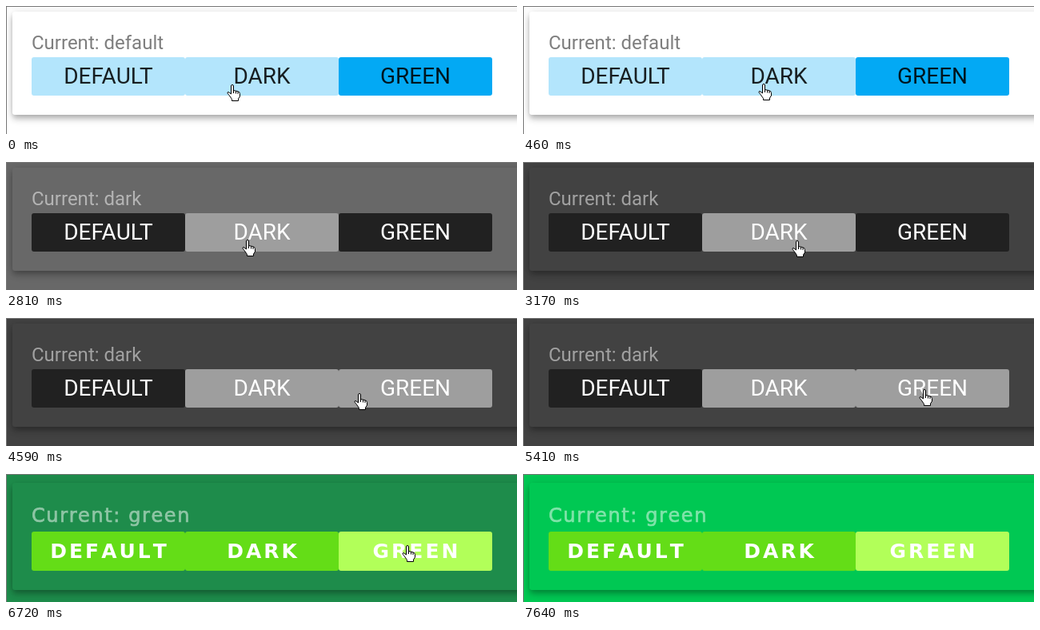
Animation of 639x160 px, one loop 9230 ms. Source, as an HTML page:

```html
<!DOCTYPE html>
<html lang="en">
<head>
<meta charset="utf-8">
<title>Theme switcher</title>
<style>
  html, body { margin: 0; width: 100%; height: 100%; overflow: hidden; }
  #stage {
    --base: #03a9f4; --lit: #b3e5fc; --ink: rgba(0,0,0,.87); --label: #000;
    position: relative; width: 639px; height: 160px; overflow: hidden;
    font-family: Roboto, sans-serif;
  }
  #stage.dark { --base: #212121; --lit: #9e9e9e; --ink: #fff; --label: #fff; }
  #stage.green {
    --base: #64dd17; --lit: #b2ff59; --ink: #fff; --label: #fff;
    font-family: "DejaVu Sans", sans-serif; font-kerning: none;
  }
  #stage > * { position: absolute; }
  #edge { inset: 0; border: solid #777; border-width: 1px 0 0 1px; }
  #card {
    left: 8px; top: 7px; width: 680px; height: 129px; border-radius: 3px; background: inherit;
    box-shadow: 0 3px 6px -1.5px rgba(0,0,0,.2), 0 6px 7.5px rgba(0,0,0,.14), 0 1.5px 15px rgba(0,0,0,.12);
  }
  #label {
    left: 32px; top: 30px; font-size: 24px; line-height: 32px; white-space: pre;
    color: var(--label); opacity: .5;
  }
  .button {
    top: 64px; width: 192px; height: 48px; border-radius: 3px; background: var(--base);
    color: var(--ink); font-size: 28px; line-height: 48px; text-align: center;
  }
  .button.lit { background: var(--lit); }
  .green #card { top: 11px; height: 134px; }
  .green #label { top: 36px; letter-spacing: 1.6px; -webkit-text-stroke: .7px; }
  .green .button {
    top: 72px; height: 49px; font-size: 25px; font-weight: bold; line-height: 50px;
    letter-spacing: 3px; text-indent: 3px;
  }
  #pointer { left: 0; top: 0; width: 17px; height: 22px; overflow: visible; }
  #pointer path { fill: #fff; stroke: #000; stroke-linejoin: round; }
</style>
</head>
<body>
<div id="stage">
  <div id="card"></div>
  <div id="edge"></div>
  <div id="label"></div>
  <svg id="pointer">
    <g id="hand">
      <path d="M5.5 12V2Q5.5 .5 7 .5T8.5 2V7.5L13 8.5Q16.5 9 16.5 11.5V15L14.5 18V20.5H6.5V18.5L3 13.5Q.5 11 1 10T3 10L5.5 12"/>
      <path d="M8.5 7V11M11.5 8.5V11.5M14 9V12"/>
    </g>
    <path id="arrow" d="M.5 .5V16L4 12.7 6.3 17.5 8.7 16.7 6.4 11.8H11.3Z"/>
  </svg>
</div>
<script>
const LOOP = 9230;
const byId = id => document.getElementById(id);
const stage = byId("stage"), label = byId("label"), pointer = byId("pointer");

const buttons = ["DEFAULT", "DARK", "GREEN"].map((text, i) => {
  const button = document.createElement("div");
  button.className = "button";
  button.textContent = text;
  button.style.left = 32 + 192 * i + "px";
  stage.insertBefore(button, pointer);
  return button;
});

// Each track holds its value until the next entry: [start ms, ...value].
const themes = [[0, "default"], [2810, "dark"], [6720, "green"]];
const litButtons = [[0, 0, 1], [2670, 1], [4590, 1, 2], [6410, 2]];
const WHITE = [255, 255, 255], GREY = [66, 66, 66], GREEN = [0, 200, 83];
const backgrounds = [
  [0, WHITE, WHITE, 0],
  [2810, WHITE, GREY, .8], [2930, WHITE, GREY, .93], [3050, WHITE, GREY, .98], [3170, WHITE, GREY, 1],
  [6720, GREY, GREEN, .55], [6870, GREY, GREEN, 1]
];
const pointerPath = [
  [0, 276, 98, "hand"], [300, 291, 97, "hand"], [460, 294, 97, "hand"], [2670, 295, 97, "hand"],
  [3050, 308, 97, "hand"], [3170, 336, 98, "hand"], [3730, 351, 98, "hand"], [3880, 354, 98, "hand"],
  [4280, 363, 98, "hand"], [4430, 405, 94, "hand"], [4590, 435, 94, "hand"], [4730, 446, 92, "hand"],
  [4855, 459, 90, "hand"], [4980, 469, 89, "hand"], [5130, 480, 89, "hand"], [5260, 489, 89, "hand"],
  [5410, 495, 89, "hand"], [7370, 503, 105, "hand"], [7490, 517, 133, "arrow"], [7640, 0, 0, "none"]
];

const valueAt = (track, t) => track.findLast(entry => entry[0] <= t).slice(1);
const mix = (a, b, k) => `rgb(${a.map((v, i) => Math.round(v + (b[i] - v) * k))})`;

function draw(t) {
  const [theme] = valueAt(themes, t);
  stage.className = theme;
  label.textContent = "Current: " + theme;
  stage.style.background = mix(...valueAt(backgrounds, t));

  const lit = valueAt(litButtons, t);
  buttons.forEach((button, i) => button.classList.toggle("lit", lit.includes(i)));

  const [x, y, shape] = valueAt(pointerPath, t);
  pointer.style.transform = `translate(${x}px, ${y}px)`;
  for (const id of ["hand", "arrow"]) byId(id).style.display = id === shape ? "" : "none";
}

const start = performance.now();
function frame() {
  draw((performance.now() - start) % LOOP);
  requestAnimationFrame(frame);
}
frame();
</script>
</body>
</html>
```
